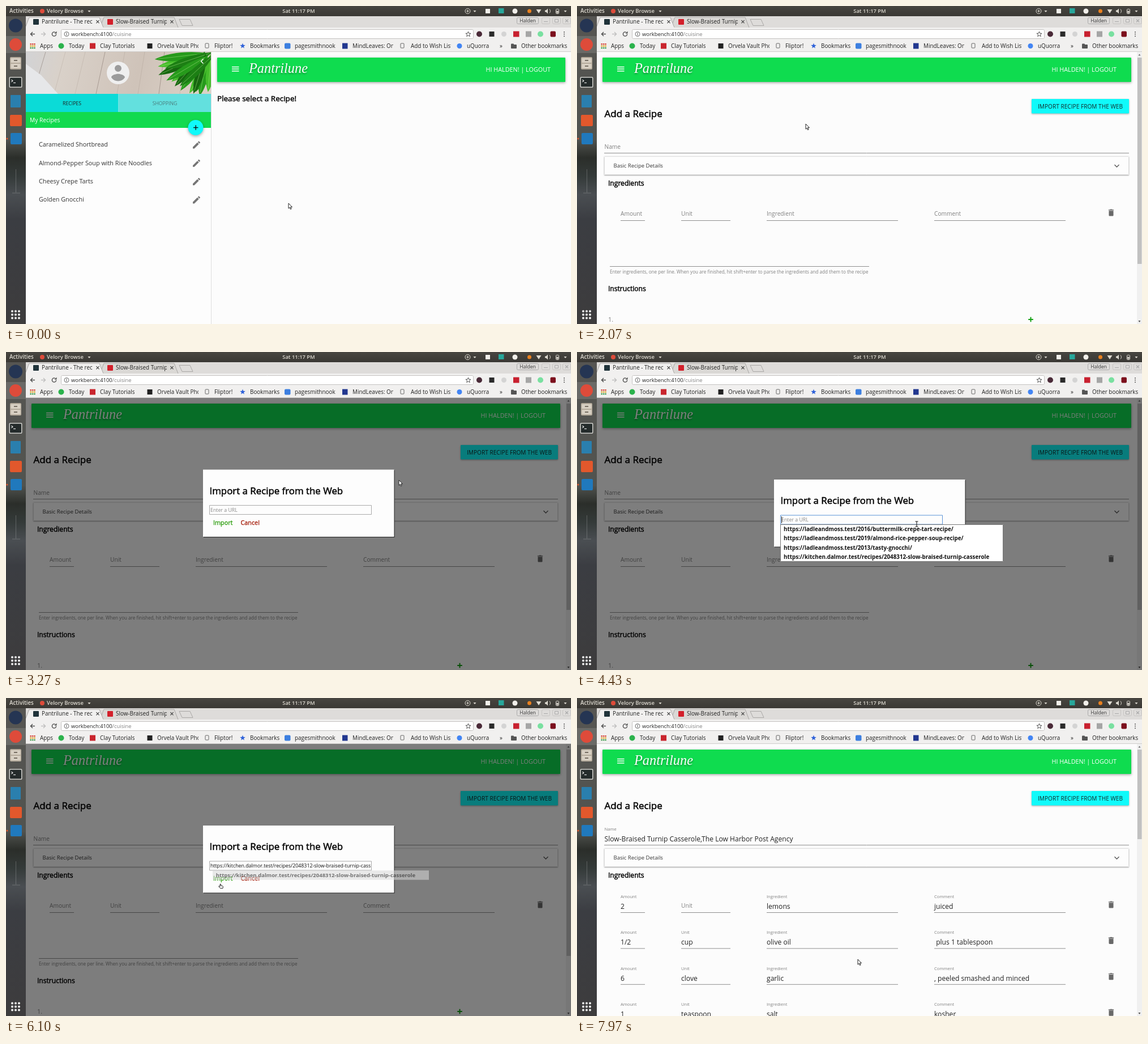
Animation of 998 by 561 pixels, one loop 8000 ms. Source, as an HTML page with a canvas:

```html
<!DOCTYPE html>
<html lang="en">
<head>
<meta charset="utf-8">
<title>Recipe import</title>
<style>
html, body { margin: 0; width: 100%; height: 100%; overflow: hidden; background: #fcfcfc; }
canvas { display: block; width: 998px; height: 561px; }
</style>
</head>
<body>
<canvas id="stage" width="998" height="561"></canvas>
<script>
const c = document.getElementById('stage').getContext('2d');
const LOOP = 8000;
const SANS = '"Open Sans", "Noto Sans", sans-serif';
const GREEN = '#0fdc4f', CYAN = '#10fafa', PAGE = '#fcfcfc', INK = '#222', GREY = '#808080';
const BRAND = 'Pantrilune', DISH = 'Slow-Braised Turnip Casserole';
const LINKS = [
  'https://ladleandmoss.test/2016/buttermilk-crepe-tart-recipe/',
  'https://ladleandmoss.test/2019/almond-rice-pepper-soup-recipe/',
  'https://ladleandmoss.test/2013/tasty-gnocchi/',
  'https://kitchen.dalmor.test/recipes/2048312-slow-braised-turnip-casserole'
];
const MINE = ['Caramelized Shortbread', 'Almond-Pepper Soup with Rice Noodles', 'Cheesy Crepe Tarts', 'Golden Gnocchi'];
const COLS = [['Amount', 77, 120], ['Unit', 184, 271], ['Ingredient', 335, 567], ['Comment', 631, 863]];
const ROWS = [
  ['2', '', 'lemons', 'juiced'],
  ['1/2', 'cup', 'olive oil', ' plus 1 tablespoon'],
  ['6', 'clove', 'garlic', ', peeled smashed and minced'],
  ['1', 'teaspoon', 'salt', 'kosher']
];
const ICON = {
  pencil: new Path2D('M3 17.25V21h3.75L17.81 9.94l-3.75-3.75zM20.71 7.04a1 1 0 0 0 0-1.41l-2.34-2.34a1 1 0 0 0-1.41 0l-1.83 1.83 3.75 3.75z'),
  trash: new Path2D('M6 19c0 1.1.9 2 2 2h8c1.1 0 2-.9 2-2V7H6zM19 4h-3.5l-1-1h-5l-1 1H5v2h14z'),
  person: new Path2D('M12 2a10 10 0 1 0 0 20 10 10 0 0 0 0-20zm0 3a3 3 0 1 1 0 6 3 3 0 0 1 0-6zm0 14.2a7.2 7.2 0 0 1-6-3.22c.03-1.99 4-3.08 6-3.08s5.97 1.09 6 3.08a7.2 7.2 0 0 1-6 3.22z'),
  arrow: new Path2D('M0 0v9.2l2.1-1.9 1.5 3.3 1.5-.7-1.5-3.2h2.9z'),
  hand: new Path2D('M-1-3c0-1.3 1.6-1.3 1.6 0v2l2.9.6c.8.2 1 .7.9 1.3l-.5 2.9h-4.2l-2.9-3.1c-.5-.8.5-1.4 1.1-.8l1.1.7z')
};
// [time, x, y]
const PATH = [
  [700, 499, 348], [1400, 339, 216], [1560, 339, 216], [1670, 357, 215], [2070, 404, 208],
  [2470, 404, 208], [2920, 828, 179], [3080, 828, 179], [3270, 694, 226], [4070, 600, 303],
  [5000, 600, 303], [5330, 560, 359], [5530, 560, 359], [6100, 379, 328], [6200, 381, 321],
  [7170, 381, 321], [7730, 496, 461]
];

const span = (t, a, b) => Math.min(1, Math.max(0, (t - a) / (b - a)));
const mix = (a, b, p) => a + (b - a) * p;
const smooth = p => p * p * (3 - 2 * p);

function text(s, x, y, size, color, { weight = 400, align = 'left', bold = 0, clip = 0 } = {}) {
  c.save();
  if (clip) {
    c.beginPath();
    c.rect(x, y - size * 1.3, clip, size * 1.8);
    c.clip();
  }
  c.font = `${weight} ${size}px ${SANS}`;
  c.textAlign = align;
  c.fillStyle = c.strokeStyle = color;
  c.fillText(s, x, y);
  if (bold) {
    c.lineWidth = bold;
    c.strokeText(s, x, y);
  }
  c.restore();
}
function box(x, y, w, h, color, r = 0) {
  c.fillStyle = color;
  c.beginPath();
  c.roundRect(x, y, w, h, r);
  c.fill();
}
function disc(x, y, r, color) {
  c.fillStyle = color;
  c.beginPath();
  c.arc(x, y, r, 0, 7);
  c.fill();
}
function line(color, width, ...pts) {
  c.strokeStyle = color;
  c.lineWidth = width;
  c.beginPath();
  for (let i = 0; i < pts.length; i += 2) c.lineTo(pts[i], pts[i + 1]);
  c.stroke();
}
function shape(color, ...pts) {
  c.fillStyle = color;
  c.beginPath();
  for (let i = 0; i < pts.length; i += 2) c.lineTo(pts[i], pts[i + 1]);
  c.fill();
}
function frame(x, y, w, h, color, r = 0) {
  c.strokeStyle = color;
  c.lineWidth = 1;
  c.beginPath();
  c.roundRect(x + .5, y + .5, w - 1, h - 1, r);
  c.stroke();
}
function icon(name, x, y, k, color) {
  c.save();
  c.translate(x - 12 * k, y - 12 * k);
  c.scale(k, k);
  c.fillStyle = color;
  c.fill(ICON[name], 'evenodd');
  c.restore();
}
function shadowed(blur, dy, draw) {
  c.save();
  c.shadowColor = 'rgba(0,0,0,.35)';
  c.shadowBlur = blur;
  c.shadowOffsetY = dy;
  draw();
  c.restore();
}
function star(x, y, r, color, filled) {
  c.beginPath();
  for (let i = 0; i < 10; i++) {
    const a = i * Math.PI / 5 - Math.PI / 2, d = i % 2 ? r * .42 : r;
    c.lineTo(x + d * Math.cos(a), y + d * Math.sin(a));
  }
  c.closePath();
  c.lineWidth = 1;
  c.fillStyle = c.strokeStyle = color;
  filled ? c.fill() : c.stroke();
}
function plus(x, y, r, color, width) {
  line(color, width, x - r, y, x + r, y);
  line(color, width, x, y - r, x, y + r);
}

function header(left, right) {
  shadowed(4, 1.5, () => box(left, 91, right - left, 43, GREEN, 1));
  for (let i = 0; i < 3; i++) box(left + 26, 106.8 + i * 3.6, 12.5, 1.5, '#fff');
  shadowed(3, 2, () => {
    c.font = 'italic 24.3px "Liberation Serif", "Noto Serif", serif';
    c.fillStyle = '#fff';
    c.fillText(BRAND, left + 56, 118);
  });
  text('HI HALDEN! | LOGOUT', right - 26, 116, 10.8, '#fff', { align: 'right' });
}

function banner() {
  c.save();
  c.beginPath();
  c.rect(35, 81, 327, 74);
  c.clip();
  const wood = c.createLinearGradient(35, 81, 362, 155);
  wood.addColorStop(0, '#d2d3d5');
  wood.addColorStop(.2, '#d9d1c9');
  wood.addColorStop(.6, '#cfc3b9');
  wood.addColorStop(1, '#ddd3c8');
  box(35, 81, 327, 74, wood);
  for (let i = 0; i < 8; i++) line(i % 3 ? 'rgba(120,100,88,.16)' : 'rgba(100,84,75,.4)', 1, 70 + i * 35, 81, 48 + i * 37, 155);
  shape('#e6e7e9', 35, 102, 62, 122, 92, 155, 35, 155);
  for (let i = 0; i < 16; i++) {
    const a = 1.45 + i * 7 % 16 * .105, len = 68 + i * 13 % 30;
    c.save();
    c.translate(350 + i * 5 % 19, 80 + i * 3 % 8);
    c.rotate(a);
    c.fillStyle = ['#16670f', '#269a1b', '#46bd2c', '#1c7f14'][i % 4];
    c.beginPath();
    c.moveTo(0, 0);
    c.quadraticCurveTo(len * .6, -15, len, 0);
    c.quadraticCurveTo(len * .6, 13, 0, 0);
    c.fill();
    line('rgba(190,240,150,.5)', .8, 8, 0, len - 6, 0);
    c.restore();
  }
  c.restore();
  disc(198, 118, 19, '#9b9b9b');
  icon('person', 198, 118, 2, '#efefef');
  line('#fff', 1.4, 348.5, 93.5, 344.5, 97.5, 348.5, 101.5);
}

function sidebar(dx, hover) {
  c.save();
  c.translate(dx, 0);
  box(35, 81, 327, 480, '#fdfdfd');
  banner();
  box(35, 155, 163.5, 32, '#0bdbd7');
  box(198.5, 155, 163.5, 32, '#63e0de');
  text('RECIPES', 116.5, 174.5, 8.7, INK, { align: 'center' });
  text('SHOPPING', 280.5, 174.5, 8.7, '#4a7c7c', { align: 'center' });
  box(35, 187, 327, 28, '#12da4f');
  text('My Recipes', 42, 205, 10.2, '#fff');
  shadowed(5, 2, () => disc(335, 214.5, 13.5, hover ? '#0f999c' : CYAN));
  plus(335.2, 214.5, 4.2, '#111', 1.4);
  MINE.forEach((name, i) => {
    text(name, 58, 248.3 + i * 32.35, 10.8, '#333');
    icon('pencil', 336.5, 245 + i * 32.35, .72, '#757575');
  });
  line('#dedede', 1, 362.5, 81, 362.5, 561);
  c.restore();
}

function field(X, col, y, value) {
  const [label, a, b] = col;
  if (value) {
    text(label, X(a), y - 26, 7.6, GREY);
    text(value, X(a), y - 7, 12.1, INK);
  } else text(label, X(a), y - 9, 10.2, GREY);
  line('#8f8f8f', 1, X(a), y - .5, X(b), y - .5);
}

function form(t, left, right, filled) {
  const X = x => left + (x - 35) * (right - left) / 954;
  text('Add a Recipe', X(48.5), 196, 17, '#000', { bold: .5 });
  const over = t > 2850 && t < 3090;
  const bx = X(975) - 172;
  shadowed(3, 1, () => box(bx, 164, 172, 25.5, over ? '#0acbd0' : CYAN, 1));
  if (t > 2930 && t < 3120) disc(829, 178, mix(8, 22, span(t, 2950, 3120)), `rgba(0,70,75,${mix(.35, 0, span(t, 2970, 3120))})`);
  text('IMPORT RECIPE FROM THE WEB', bx + 86, 180.7, 10.15, '#132a2a', { align: 'center' });

  if (filled) {
    text('Name', 48.5, 234, 7.6, GREY);
    text(DISH + ',The Low Harbor Post Agency', 48.5, 253, 12.1, INK);
  } else text('Name', X(48.5), 251.5, 10.2, GREY);
  line('#8f8f8f', 1, X(48), 259.5, X(975), 259.5);

  shadowed(2, 1, () => box(X(48), 265, X(975) - X(48), 33, '#fdfdfd', 1));
  frame(X(48), 265, X(975) - X(48), 33, '#dcdcdc', 1);
  text('Basic Recipe Details', X(64.5), 285, 9.5, '#333');
  const cx = X(953.5);
  line('#555', 1.3, cx - 4, 280, cx, 284, cx + 4, 280);
  text('Ingredients', X(55), 317, 12.1, '#000', { bold: .45 });

  (filled ? ROWS : [['', '', '', '']]).forEach((row, i) => {
    const y = 379 + i * 63.4;
    COLS.forEach((col, j) => field(X, col, y, row[j]));
    icon('trash', X(943.5), y - 14.5, .67, '#686868');
  });
  if (filled) return;
  line('#8f8f8f', 1, X(58), 459.5, X(516), 459.5);
  text('Enter ingredients, one per line. When you are finished, hit shift+enter to parse the ingredients and add them to the recipe', X(58), 472, 8.1, GREY);
  text('Instructions', X(55), 503, 12.1, '#000', { bold: .45 });
  text('1.', X(55), 556.5, 10.8, GREY);
  plus(X(801.5), 553, 4.3, '#12a012', 2);
}

function scrollbar(filled) {
  box(989, 81, 9, 480, '#f0f0f0');
  box(990, 91, 7.5, filled ? 158 : 364, '#c1c1c1');
  shape('#707070', 991.5, 87.5, 993.5, 84.5, 995.5, 87.5);
  shape('#505050', 991.5, 555, 993.5, 558, 995.5, 555);
}

function popup(t) {
  const one = t >= 5530;
  const gone = span(t, 6030, 6170), h = one ? 17 : 66;
  const show = span(t, 4270, 4400);
  const k = one ? 1 - .06 * gone : mix(.94, 1, show);
  const hot = t > 5060 ? Math.min(3, Math.floor(span(t, 5060, 5300) * 3.99)) : -1;
  c.save();
  c.globalAlpha = one ? 1 - .9 * gone : show;
  c.translate(556, 304 + h / 2);
  c.scale(k, k);
  c.translate(-556, -304 - h / 2);
  box(359, 304, 394, h, one ? '#d9d9d9' : '#fff');
  if (!one && hot >= 0) box(360, 304.5 + hot * 16.3, 392, 16.3, '#d9d9d9');
  if (!gone) frame(359, 304, 394, h, '#777');
  (one ? [LINKS[3]] : LINKS).forEach((url, i) => text(url, 365, 316 + i * 16.3, 9.8, '#111', { weight: 700 }));
  c.restore();
}

function modal(t) {
  const out = span(t, 7170, 7350);
  const dim = Math.min(span(t, 3070, 3210), 1 - out);
  if (dim <= 0) return;
  box(35, 81, 963, 480, `rgba(0,0,0,${.5 * dim})`);
  const y = 225 - 267 * (1 - span(t, 3070, 3340)) ** 2 - 270 * out * out;
  const focus = t >= 4170 && t < 6030;
  box(349, y + 1, 337.5, 118.5, '#222');
  box(348, y, 337.5, 118.5, '#fdfdfd');
  text('Import a Recipe from the Web', 359.5, y + 43, 16.85, '#000', { bold: .5 });
  frame(359, y + 62.5, 287, 17, focus ? '#5b93d6' : '#a9a9a9');
  if (t >= 5530) text(LINKS[3], 361, y + 74.2, 8.8, '#111', { clip: 283 });
  else text('Enter a URL', 361, y + 74.2, 8.8, '#888');
  if (focus && t < 5530) line('#222', 1, 361.5, y + 65, 361.5, y + 77);
  text('Import', 366, y + 97, 10.8, '#2b9d0c', { bold: .35 });
  text('Cancel', 414.5, y + 97, 10.8, '#a51d0a', { bold: .35 });
  if (t > 4270 && t < 6170) popup(t);
}

function tab(x, w, fill) {
  c.beginPath();
  c.moveTo(x, 38);
  c.lineTo(x + 7, 20);
  c.lineTo(x + w - 7, 20);
  c.lineTo(x + w, 38);
  c.fillStyle = fill;
  c.fill();
  c.strokeStyle = '#aaa8a6';
  c.lineWidth = 1;
  c.stroke();
}
function cross(x, y, r, color) {
  line(color, 1.2, x - r, y - r, x + r, y + r);
  line(color, 1.2, x - r, y + r, x + r, y - r);
}
function sheet(x) {
  frame(x - 3.5, 65.5, 7, 9, '#666', 1);
}

function browser() {
  box(0, 18, 998, 63, '#dedcda');
  tab(166, 138, '#dad8d5');
  box(35, 38, 963, 43, '#f1f0ef');
  tab(34, 138, '#f1f0ef');
  box(35, 37.5, 137, 2, '#f1f0ef');
  box(48, 23, 10, 10, '#20333a', 1);
  box(179, 23, 10, 10, '#d3202b', 1);
  text(BRAND + ' - The recipe', 63, 31.3, 9.9, INK, { clip: 90 });
  text(DISH, 194, 31.3, 9.9, INK, { clip: 90 });
  cross(162, 27.8, 2.6, '#444');
  cross(293, 27.8, 2.6, '#444');
  line('#aaa8a6', 1, 306, 23.5, 325, 23.5, 330, 34.5, 311, 34.5, 306, 23.5);
  frame(902, 20, 39, 12, '#aaa', 2);
  text('Halden', 921.5, 29, 8.6, '#555', { align: 'center', bold: .2 });
  for (const x of [946, 965, 983]) frame(x, 20, 15, 12, '#c6c4c2', 2);
  line('#aaa', 1, 950, 27.5, 957, 27.5);
  frame(969, 23, 7, 6, '#aaa');
  cross(990.5, 26, 2.5, '#aaa');

  line('#4a4a4a', 1.4, 51, 49.5, 43.5, 49.5);
  line('#4a4a4a', 1.4, 47, 46, 43.5, 49.5, 47, 53);
  line('#bdbdbd', 1.4, 62, 49.5, 69.5, 49.5);
  line('#bdbdbd', 1.4, 66, 46, 69.5, 49.5, 66, 53);
  c.strokeStyle = '#4a4a4a';
  c.beginPath();
  c.arc(85, 49.5, 3.6, 0, 5.2);
  c.stroke();
  shape('#4a4a4a', 85.5, 48.5, 89.5, 48.5, 89.5, 44.5);
  box(97, 41, 729, 17, '#fff', 2);
  frame(97, 41, 729, 17, '#c4c2c0', 2);
  c.strokeStyle = '#666';
  c.beginPath();
  c.arc(107, 49.5, 4, 0, 7);
  c.stroke();
  line('#666', 1, 107, 47, 107, 52);
  text('workbench:4100', 115, 53, 9.4, INK);
  c.font = `9.4px ${SANS}`;
  text('/cuisine', 115 + c.measureText('workbench:4100').width, 53, 9.4, GREY);
  star(816.5, 49.8, 4.8, '#555');
  disc(836, 49.5, 5, '#4a2a38');
  box(853.5, 45, 9, 9, '#2b2b2b');
  disc(879.5, 49.5, 4.5, '#d4d4d4');
  box(896, 44.5, 10.5, 10, '#c8202f');
  box(918, 44.5, 10, 10, '#a5a5a5');
  disc(944, 49.5, 5, '#79e0a0');
  box(961.5, 44.5, 9.5, 10, '#7c0f1d', 2);
  for (let i = 0; i < 3; i++) disc(986, 46 + i * 3.6, 1, '#555');

  for (let i = 0; i < 9; i++) box(42.5 + i % 3 * 3.4, 66 + Math.floor(i / 3) * 3.4, 2.4, 2.4, ['#d8453a', '#dba52b', '#3e9b4f'][Math.floor(i / 3)]);
  disc(97.5, 70.5, 5, '#2bb24c');
  box(148, 65.5, 10, 10, '#c9252d');
  box(249.5, 66, 9, 9, '#222');
  sheet(355);
  star(418, 70.5, 5, '#2f62d9', true);
  box(492, 65.5, 10.5, 10, '#3c7fe0', 2);
  box(594, 65.5, 9.5, 10, '#22378f');
  sheet(700);
  disc(801, 70.5, 4.5, '#4285f4');
  box(892, 68, 10, 7, '#555', 1);
  box(892, 66.5, 5, 3, '#555', 1);
  const marks = [['Apps', 60], ['Today', 111], ['Clay Tutorials', 166, 69], ['Orvela Vault Photos', 267, 73], ['Fliptor!', 368],
    ['Bookmarks', 431], ['pagesmithnook days', 510, 74], ['MindLeaves: Online', 612, 72], ['Add to Wish List', 715, 71], ['uQuorra', 814], ['»', 872], ['Other bookmarks', 910]];
  for (const [s, x, clip] of marks) text(s, x, 74, 9.9, INK, { clip });
  line('#cfcdcb', 1, 35, 80.5, 998, 80.5);
}

function panel() {
  const bar = c.createLinearGradient(0, 0, 0, 18);
  bar.addColorStop(0, '#484641');
  bar.addColorStop(1, '#3a3834');
  box(0, 0, 998, 18, bar);
  const ink = '#dfdbd2', semi = { weight: 600 };
  text('Activities', 6, 12.3, 9.8, ink, semi);
  disc(64, 9, 4, '#de4b3a');
  text('Velory Browse', 72, 12.3, 9.5, ink, semi);
  text('Sat 11:17 PM', 517, 12.3, 9.4, ink, { weight: 600, align: 'center' });
  for (const x of [147, 828, 988]) shape(ink, x - 2.5, 8, x + 2.5, 8, x, 11);
  c.strokeStyle = ink;
  c.lineWidth = 1;
  c.beginPath();
  c.arc(815.5, 9, 4.5, 0, 7);
  c.stroke();
  plus(815.5, 9, 2.4, ink, 1);
  box(847, 5, 8, 8, '#f1efea');
  box(870, 4, 9.5, 9, '#28a79b');
  disc(899, 9, 4.5, '#f1efea');
  disc(924.5, 9, 3.5, '#e8801f');
  shape(ink, 936.5, 6, 945.5, 6, 941, 13);
  shape(ink, 952, 7.5, 954, 7.5, 957, 4.5, 957, 13.5, 954, 10.5, 952, 10.5);
  c.beginPath();
  c.arc(957, 9, 4.5, -.9, .9);
  c.stroke();
  frame(971, 5, 6, 9, ink, 1);
  box(972.5, 8.5, 3, 4, ink);
}

function dock() {
  const g = c.createLinearGradient(0, 18, 0, 561);
  [[0, '#565552'], [.4, '#51534f'], [.46, '#2b2e2a'], [.52, '#343a39'], [.58, '#4a4e52'], [.66, '#3b3d42'], [1, '#3d3c3d']].forEach(s => g.addColorStop(...s));
  box(0, 18, 35, 543, g);
  line('rgba(220,220,220,.25)', 1, 17.5, 288, 17.5, 329);
  line('rgba(220,220,220,.25)', 1, 11, 330, 25, 330);
  disc(17, 34.5, 12, '#253553');
  box(0, 53, 35, 30, 'rgba(255,255,255,.12)');
  disc(17, 68, 11, '#de4b3a');
  box(7, 90, 20, 22, '#b5ab9c', 2);
  box(8.5, 92, 17, 8, '#d8d0c3', 1);
  box(8.5, 102, 17, 8, '#d8d0c3', 1);
  box(14, 95, 6, 2, '#776f64');
  box(14, 105, 6, 2, '#776f64');
  box(5.5, 125, 23, 19, '#cfcfcb', 2);
  box(7, 126.5, 20, 16, '#242b2b', 1);
  line('#eee', 1.2, 9.5, 130, 12, 132, 9.5, 134);
  line('#eee', 1.2, 13, 135.5, 17, 135.5);
  box(8, 157, 18, 22, '#2a7fae', 1);
  box(7, 192, 21, 20, '#e2582c', 2);
  box(8, 224, 20, 20, '#2079bd', 2);
  disc(2, 234, 1.5, '#e2582c');
  for (let i = 0; i < 9; i++) disc(11 + i % 3 * 6, 538.5 + Math.floor(i / 3) * 6, 2, '#f2f2f2');
}

function pointer(t) {
  let [, x, y] = PATH[0];
  for (let i = 1; i < PATH.length; i++) {
    const p = smooth(span(t, PATH[i - 1][0], PATH[i][0]));
    if (p > 0) {
      x = mix(PATH[i - 1][1], PATH[i][1], p);
      y = mix(PATH[i - 1][2], PATH[i][2], p);
    }
  }
  const hand = t > 1300 && t < 1630 || t > 6040 && t < 7200;
  const beam = t > 3900 && t < 5040;
  c.save();
  c.translate(x, y);
  if (beam) {
    line('#222', 1.1, -2.5, -4, 2.5, -4);
    line('#222', 1.1, 0, -4, 0, 5);
    line('#222', 1.1, -2.5, 5, 2.5, 5);
  } else {
    const path = ICON[hand ? 'hand' : 'arrow'];
    if (hand) c.translate(0, 4);
    c.fillStyle = '#fff';
    c.strokeStyle = '#222';
    c.lineWidth = 1;
    c.fill(path);
    c.stroke(path);
  }
  c.restore();
}

function draw(t) {
  const slide = smooth(span(t, 1730, 2070));
  const left = mix(363, 35, slide), right = mix(998, 989, slide);
  const filled = t >= 7170;
  box(0, 0, 998, 561, PAGE);
  header(left + 10, right - 10);
  if (t < 1730) text('Please select a Recipe!', 373, 167.5, 13.5, '#000', { bold: .45 });
  else form(t, left, right, filled);
  if (slide < 1) sidebar(left - 363, t > 1330);
  if (t >= 1730) scrollbar(filled);
  modal(t);
  browser();
  panel();
  dock();
  pointer(t);
}

const start = performance.now();
function tick() {
  draw((performance.now() - start) % LOOP);
  requestAnimationFrame(tick);
}
tick();
</script>
</body>
</html>
```
